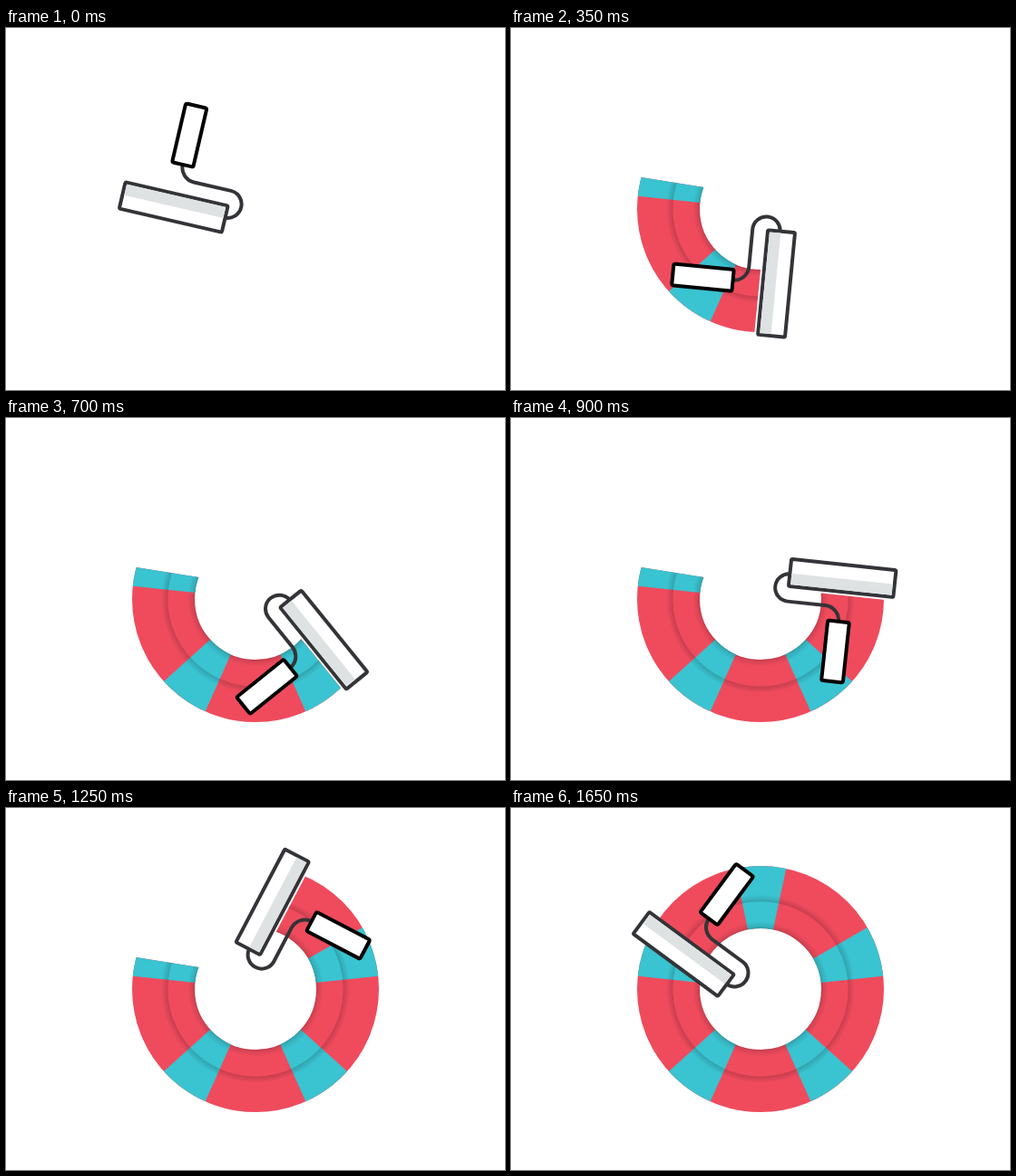
Recreate the animation shown at these times as an HTML page. Size 550 by 400 pixels, loop 1.7 s.

```html
<!DOCTYPE html>
<html lang="en">
<head>
<meta charset="utf-8">
<title>Paint roller ring</title>
<style>
html, body { margin: 0; width: 100%; height: 100%; overflow: hidden; background: #fff; }
svg { display: block; width: 100vw; height: 100vh; }
</style>
</head>
<body>
<svg viewBox="0 0 550 400">
  <defs>
    <clipPath id="wipe"><path id="wedge"/></clipPath>
    <radialGradient id="shade" gradientUnits="userSpaceOnUse" cx="275" cy="200" r="136">
      <stop offset=".4926" stop-color="#000" stop-opacity=".2"/>
      <stop offset=".507" stop-color="#000" stop-opacity=".11"/>
      <stop offset=".55" stop-color="#000" stop-opacity="0"/>
      <stop offset=".707" stop-color="#000" stop-opacity="0"/>
      <stop offset=".713" stop-color="#000" stop-opacity=".16"/>
      <stop offset=".765" stop-color="#000" stop-opacity="0"/>
    </radialGradient>
  </defs>
  <g id="ring" clip-path="url(#wipe)" fill="none" stroke-width="69">
    <circle cx="275" cy="200" r="101.5" stroke="#ef4b5d"/>
    <path id="bands" stroke="#3ac3d0"/>
    <circle cx="275" cy="200" r="101.5" stroke="url(#shade)"/>
  </g>
  <g id="tool" fill="none" stroke="#333438" stroke-width="4" stroke-linejoin="round">
    <path d="M-88.3-23A16.5 16.5 0 0 0-71.8-6.5H-30A15.2 15.2 0 0 1-30 23.9"/>
    <rect x="-145.4" y="10.4" width="116" height="30" rx="1.5" fill="#fff"/>
    <rect x="-143.4" y="12.4" width="112" height="12.4" fill="#dfe2e3" stroke="none"/>
    <rect x="-100.2" y="-89.3" width="23.8" height="66.6" rx="2" fill="#fff" stroke="#000"/>
  </g>
</svg>
<script>
const $ = id => document.getElementById(id);
const LOOP = 1700, STEP = 50, LAST = 33;
const PIVOT = [275.6, 193];
const START = 9.06, REACH = 190;

// [step, degrees turned], joined by a monotone cubic
const keys = [[0, 0], [7, 97.6], [11, 130.5], [14, 142], [18, 187], [21, 209.8], [22, 220], [28, 290], [33, 336.6]];
const rise = keys.slice(1).map((k, i) => (k[1] - keys[i][1]) / (k[0] - keys[i][0]));
const slope = keys.map((k, i) => {
  const a = rise[i - 1], b = rise[i];
  return a === undefined ? b : b === undefined ? a : 2 * a * b / (a + b);
});

function turned(x) {
  let i = 0;
  while (i < keys.length - 2 && x > keys[i + 1][0]) i++;
  const [x0, y0] = keys[i], [x1, y1] = keys[i + 1];
  const h = x1 - x0, t = (x - x0) / h, s = 1 - t;
  return y0 * (1 + 2 * t) * s * s + y1 * t * t * (3 - 2 * t)
    + h * t * s * (slope[i] * s - slope[i + 1] * t);
}

function place(deg, x, y, [cx, cy] = PIVOT) {
  const a = deg * Math.PI / 180, c = Math.cos(a), s = Math.sin(a);
  return (cx + x * c - y * s).toFixed(2) + ' ' + (cy + x * s + y * c).toFixed(2);
}

function bands() {
  let d = '';
  for (let i = 0; i < 5; i++) {
    const mid = -90 + i * 72, at = a => place(a, 101.5, 0, [275, 200]);
    d += `M${at(mid - 12)}A101.5 101.5 0 0 1 ${at(mid + 12)}`;
  }
  return d;
}

function wedge(angle) {
  const big = START - angle > 176 ? 1 : 0;
  return `M${place(START, -30, -6.8)}L${place(START, -REACH, -6.8)}` +
    `A${REACH} ${REACH} 0 ${big} 0 ${place(angle, -REACH, 6.5)}L${place(angle, -30, 6.5)}Z`;
}

function draw(ms) {
  const step = Math.floor((ms % LOOP) / STEP);
  const angle = 13.06 - turned(step);
  $('tool').setAttribute('transform', `translate(${PIVOT}) rotate(${angle.toFixed(3)})`);
  $('ring').style.display = step ? '' : 'none';
  $('wedge').setAttribute('d', step < LAST ? wedge(angle) : 'M0 0H550V400H0Z');
}

$('bands').setAttribute('d', bands());
const begin = performance.now();
function tick() {
  draw(performance.now() - begin);
  requestAnimationFrame(tick);
}
tick();
</script>
</body>
</html>
```
